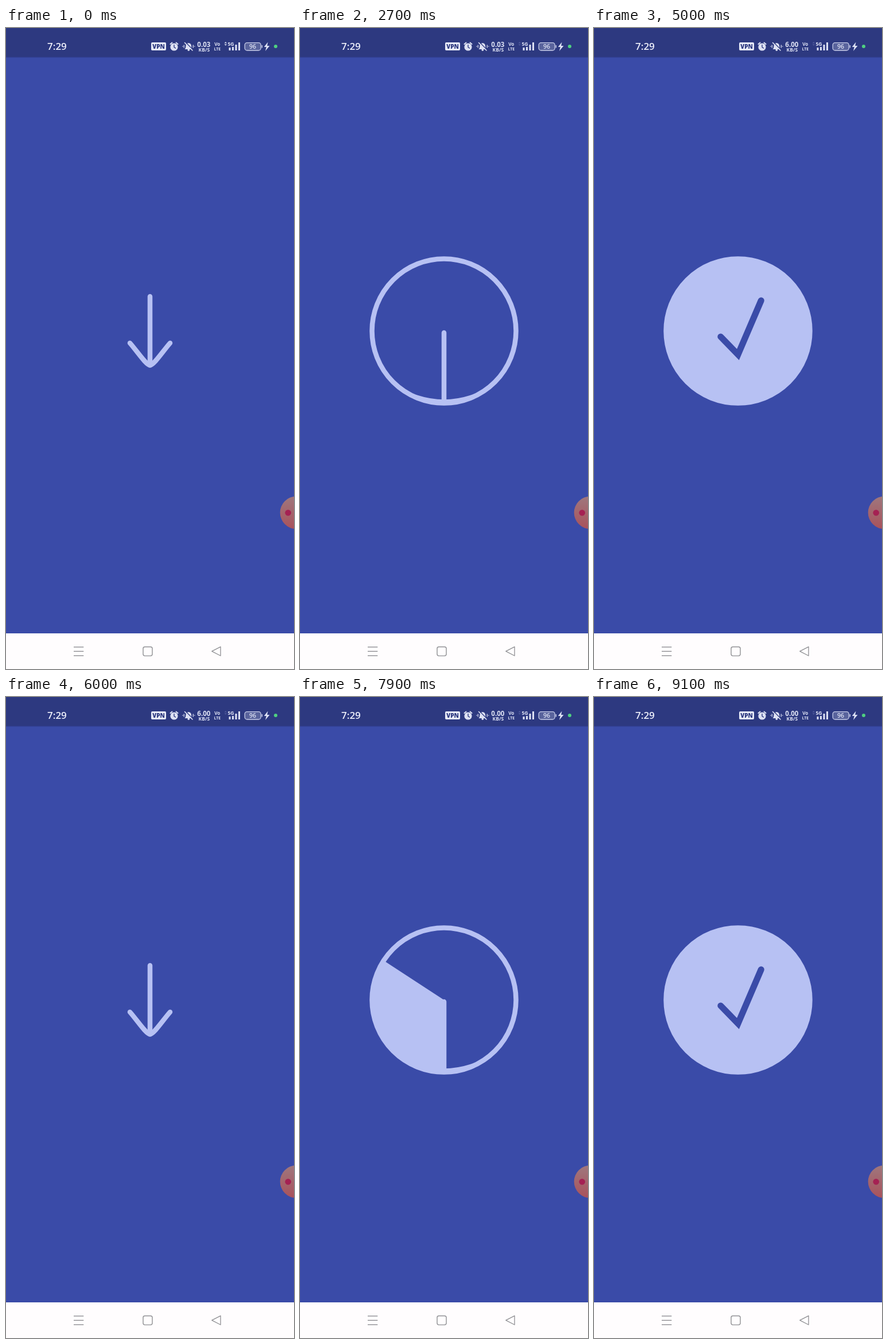
Write an HTML page with a canvas that moves like this. It is 502x1115 px and loops after 9800 ms.

```html
<!DOCTYPE html>
<html lang="en">
<head>
<meta charset="utf-8">
<title>Download button</title>
<style>
  html, body { margin: 0; width: 100%; height: 100%; overflow: hidden; background: #3a4ba8; }
  canvas { display: block; width: 502px; height: 1115px; }
</style>
</head>
<body>
<canvas id="stage" width="502" height="1115"></canvas>
<script>
const ctx = document.getElementById('stage').getContext('2d');
const LOOP = 9800, CYCLE = 4900;
const CX = 251, CY = 527, R = 125.5, LINE = 8.5;
const BG = '#3a4ba8', LIGHT = '#b7c1f3', ICON = '#dde1f3', BAR = '#2d3980', GREY = '#8f8f93';
const FONT = '"Open Sans", "Noto Sans", sans-serif';
const TAU = Math.PI * 2, DOWN = Math.PI / 2;

// Left half of the arrow head and of the bowl: [dx, y] cubic points
const HEAD = [[-35, 548], [-23, 561.5], [-7, 586], [0, 586.5]];
const BOWL = [[-50, 642], [-33.3, 647.3], [-16.7, 650.5], [0, 650.5]];

const ramp = (t, from, to) => Math.min(1, Math.max(0, (t - from) / (to - from)));
const mix = (a, b, p) => a + (b - a) * p;
const rad = deg => deg * Math.PI / 180;

function pen(color, width, cap = 'round', join = 'round') {
  ctx.strokeStyle = color;
  ctx.lineWidth = width;
  ctx.lineCap = cap;
  ctx.lineJoin = join;
}

function poly(points, close) {
  ctx.beginPath();
  points.forEach(([x, y]) => ctx.lineTo(x, y));
  if (close) ctx.closePath();
}

function line(...points) {
  poly(points);
  ctx.stroke();
}

function shape(color, ...points) {
  ctx.fillStyle = color;
  poly(points, true);
  ctx.fill();
}

function disc(x, y, r, color) {
  ctx.fillStyle = color;
  ctx.beginPath();
  ctx.arc(x, y, r, 0, TAU);
  ctx.fill();
}

function box(x, y, w, h, r) {
  ctx.beginPath();
  ctx.roundRect(x, y, w, h, r);
}

function text(str, x, y, size, weight = 700, color = ICON, align = 'center') {
  ctx.font = `${weight} ${size}px ${FONT}`;
  ctx.fillStyle = color;
  ctx.textAlign = align;
  ctx.fillText(str, x, y);
}

function alarm() {
  disc(293, 33, 6.6, ICON);
  pen(ICON, 2);
  line([286.5, 28], [289.5, 25.5]);
  line([299.5, 28], [296.5, 25.5]);
  pen(BAR, 1.4);
  line([293, 29.5], [293, 33.3], [295.5, 35]);
}

function mutedBell() {
  ctx.fillStyle = ICON;
  ctx.beginPath();
  ctx.moveTo(311.5, 37);
  ctx.quadraticCurveTo(313.5, 35, 313.5, 31);
  ctx.bezierCurveTo(313.5, 24.5, 323, 24.5, 323, 31);
  ctx.quadraticCurveTo(323, 35, 325, 37);
  ctx.fill();
  disc(318.3, 38.2, 1.8, ICON);
  pen(BAR, 1.6);
  line([312.5, 24.5], [326, 38]);
  pen(ICON, 1.6);
  line([311.5, 25.5], [325, 39]);
  pen(ICON, 1.3);
  line([310.3, 30], [310.3, 34]);
  line([326.3, 30], [326.3, 34]);
  disc(308, 32, 0.8, ICON);
  disc(328.7, 32, 0.8, ICON);
}

function signal(active) {
  const color = active ? ICON : '#505b9b';
  shape(color, [380.5, 26.5], [382.8, 24], [385, 26.5]);
  shape(color, [380.5, 28.3], [382.8, 30.8], [385, 28.3]);
  text('5G', 392, 31, 8.5);
  ctx.fillStyle = ICON;
  [5, 6, 10, 14].forEach((h, i) => ctx.fillRect(388.5 + i * 5.5, 39 - h, 3, h));
}

function battery() {
  pen('#c9cee9', 1.3);
  ctx.fillStyle = '#59639c';
  box(416.2, 25.6, 28, 13.4, 4);
  ctx.fill();
  ctx.stroke();
  pen('#c9cee9', 1.5);
  line([446.3, 30.5], [446.3, 34]);
  text('96', 430, 36.2, 10.5, 600);
  shape(ICON, [456.5, 24.5], [449.8, 33], [453.8, 33], [452, 40], [459.5, 31], [455.2, 31]);
}

function statusBar(t) {
  ctx.fillStyle = BAR;
  ctx.fillRect(0, 0, 502, 51);
  ctx.fillStyle = '#334193';
  ctx.fillRect(0, 50.5, 502, 1);
  text('7:29', 72, 38.3, 17, 600, '#eef0fb', 'left');

  ctx.fillStyle = '#e6e9f7';
  box(253, 25, 26, 14, 2);
  ctx.fill();
  text('VPN', 266, 35.8, 10, 800, BAR);

  alarm();
  mutedBell();
  const speed = t < 3100 ? '0.03' : t < 7600 ? '6.00' : '0.00';
  text(speed, 344.8, 32.5, 11.5);
  text('KB/S', 345.3, 41, 8.5);
  text('Vo', 368.3, 31, 8);
  text('LTE', 368.3, 39.2, 7);
  signal(t < 300);
  battery();
  disc(470, 32, 3, '#4fd080');
}

function navBar() {
  ctx.fillStyle = '#fffdfe';
  ctx.fillRect(0, 1053, 502, 62);
  pen(GREY, 1.4, 'butt');
  [1076.8, 1084.3, 1091.8].forEach(y => line([118, y], [135.3, y]));
  box(239, 1076.5, 16, 15.6, 3);
  ctx.stroke();
  poly([[358.8, 1084.2], [374, 1076.3], [374, 1092]], true);
  pen(GREY, 1.3);
  ctx.stroke();
}

function floatingButton() {
  const fill = ctx.createLinearGradient(0, 815, 0, 871);
  fill.addColorStop(0, '#9f777d');
  fill.addColorStop(1, '#a9525c');
  disc(506, 843, 28.3, fill);
  disc(491.7, 843.2, 5.3, '#a52153');
}

function head(p) {
  const half = HEAD.map(([x, y], i) => [mix(x, BOWL[i][0], p), mix(y, BOWL[i][1], p)]);
  const [a, b, c, d] = half;
  ctx.beginPath();
  ctx.moveTo(CX + a[0], a[1]);
  ctx.bezierCurveTo(CX + b[0], b[1], CX + c[0], c[1], CX, d[1]);
  ctx.bezierCurveTo(CX - c[0], c[1], CX - b[0], b[1], CX - a[0], a[1]);
  ctx.stroke();
}

function ring(p) {
  const left = rad(mix(23.6, 180, p)), right = rad(mix(18.8, 180, p));
  ctx.beginPath();
  ctx.arc(CX, CY, R, DOWN - right, DOWN + left);
  ctx.stroke();
}

function pie(p) {
  ctx.fillStyle = LIGHT;
  ctx.beginPath();
  ctx.moveTo(CX, CY);
  ctx.arc(CX, CY, R, DOWN, DOWN + TAU * p);
  ctx.fill();
}

function check() {
  pen(BG, 11, 'round', 'miter');
  line([220.8, 537], [251, 568], [291.3, 474]);
}

function download(t) {
  const morph = ramp(t, 1110, 1290);
  const sweep = ramp(t, 1607, 2700);
  const fill = ramp(t, 2700, 3580);
  pen(LIGHT, LINE);
  line([CX, mix(467, 530, morph)], [CX, mix(586.5, 650, morph)]);
  head(morph);
  if (sweep > 0) ring(sweep);
  if (fill > 0) pie(fill);
  if (t >= 3900) check();
}

function draw(t) {
  ctx.fillStyle = BG;
  ctx.fillRect(0, 0, 502, 1115);
  // The finished check stays until the second tap at 6 s
  const local = t < 6000 ? t : t - CYCLE;
  download(local);
  statusBar(t);
  floatingButton();
  navBar();
}

const start = performance.now();
function tick() {
  draw((performance.now() - start) % LOOP);
  requestAnimationFrame(tick);
}
tick();
</script>
</body>
</html>
```
